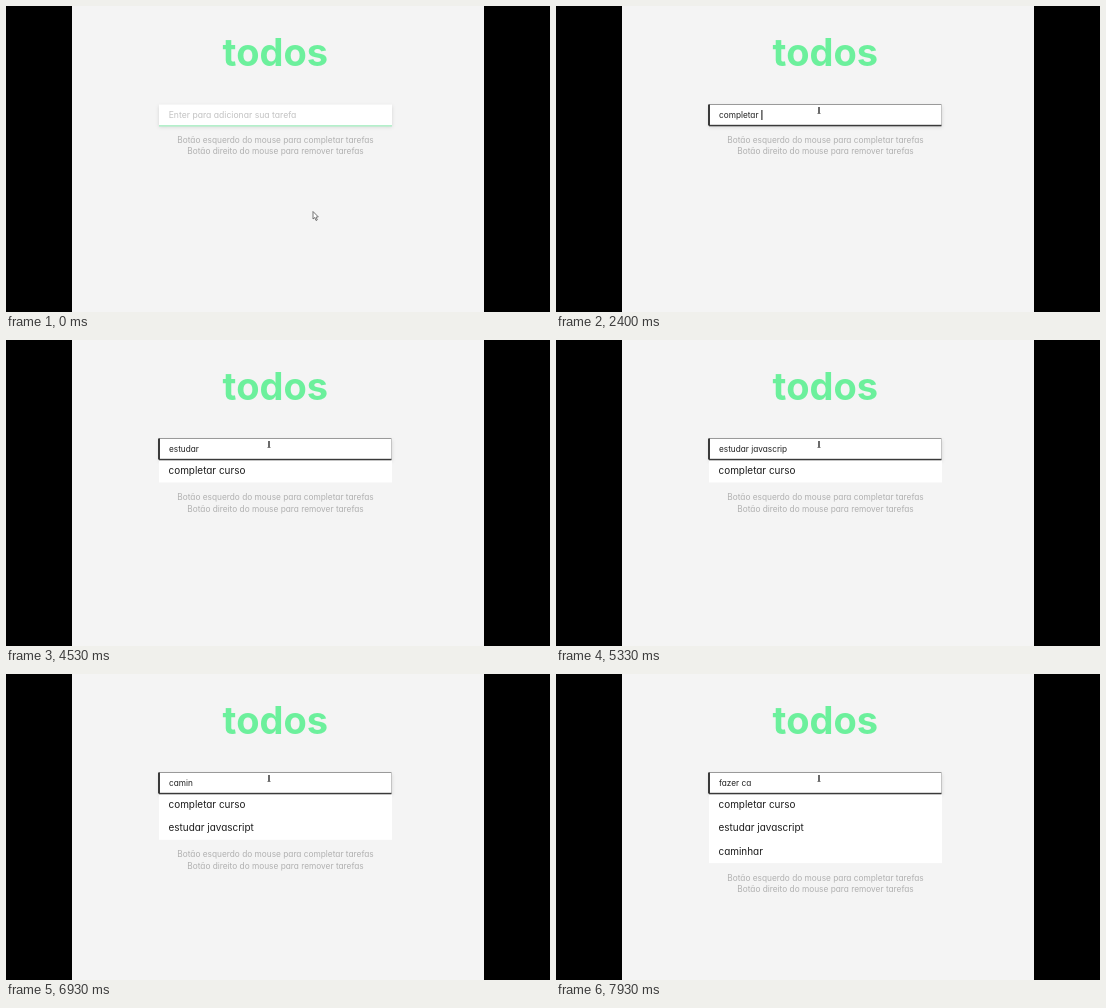
Recreate the animation shown at these times as an HTML page with a canvas. Size 544 px wide and 306 px high, loop 8000 ms.

```html
<!DOCTYPE html>
<html lang="pt">
<head>
<meta charset="utf-8">
<title>todos</title>
<style>
  html, body { margin: 0; width: 100%; height: 100%; overflow: hidden; background: #000; }
  canvas, svg { position: absolute; left: 0; top: 0; width: 544px; height: 306px; }
  svg { filter: blur(.35px); }
  text {
    font-family: Inter, "Open Sans", sans-serif;
    font-feature-settings: "cv11" 1;
    white-space: pre;
  }
  .title { font-size: 38px; font-weight: 700; fill: #6cf09c; text-anchor: middle; }
  .hint { font-size: 8.3px; fill: #b0b0b0; text-anchor: middle; }
  .ghost { font-size: 8.65px; fill: #c2c2c2; }
  .field { font-size: 8.25px; fill: #222; }
  .item { font-size: 9.95px; fill: #1c1c1c; }
</style>
</head>
<body>
<canvas id="stage" width="544" height="306"></canvas>
<svg id="words" viewBox="0 0 544 306"></svg>
<script>
const LOOP = 8000, TICK = 1000 / 15, ROW = 23.3;
const BOX = { x: 153, y: 98.5, w: 233, h: 21 };

// Key strokes per tick: "<" erases, "\n" adds the task
const KEYS = [
  [28, 'c|o|m|p|l|e|t|a|r |c|u|rs|o'], [44, '\n'],
  [52, 'e|s|t|d||<|<|<'], [63, 's|t|u|d|a|r| |j|ava'], [76, 's|c|r|i|p|t'], [85, '\n'],
  [101, 'c|a|m|in|har'], [109, '\n'],
  [112, 'f|a|z|e|r| |c|a']
];

// Tick ranges with a visible caret
const CARET = [
  [7, 10], [13, 15], [18, 21], [23, 26], [35, 37], [40, 42], [44, 46], [49, 52],
  [60, 63], [71, 74], [85, 88], [90, 93], [96, 98], [105, 108], [109, 112]
];

const canvas = document.getElementById('stage');
const ctx = canvas.getContext('2d');
const svg = document.getElementById('words');

const ratio = window.devicePixelRatio || 1;
canvas.width = 544 * ratio;
canvas.height = 306 * ratio;
ctx.scale(ratio, ratio);

function label(kind, x, y, content = '') {
  const el = document.createElementNS('http://www.w3.org/2000/svg', 'text');
  el.setAttribute('class', kind);
  el.setAttribute('x', x);
  el.setAttribute('y', y);
  el.textContent = content;
  svg.appendChild(el);
  return el;
}

label('title', 269.3, 60.3, 'todos');
const ghost = label('ghost', 162.7, 111.6, 'Enter para adicionar sua tarefa');
const field = label('field', 163, 111.6);
const items = [0, 1, 2].map(i => label('item', 162.5, 133.9 + i * ROW));
const hints = [
  label('hint', 269.5, 0, 'Botão esquerdo do mouse para completar tarefas'),
  label('hint', 269.5, 0, 'Botão direito do mouse para remover tarefas')
];

function stateAt(tick) {
  const tasks = [];
  let value = '';
  for (const [start, keys] of KEYS) {
    keys.split('|').forEach((key, i) => {
      if (start + i > tick) return;
      if (key === '\n') {
        tasks.push(value);
        value = '';
      } else if (key === '<') value = value.slice(0, -1);
      else value += key;
    });
  }
  return { tasks, value };
}

function rect(color, x, y, w, h) {
  ctx.fillStyle = color;
  ctx.fillRect(x, y, w, h);
}

function drawBox(focused, count) {
  ctx.save();
  ctx.shadowColor = 'rgba(0,0,0,.13)';
  ctx.shadowBlur = 4 * ratio;
  ctx.shadowOffsetY = ratio;
  rect('#fff', BOX.x, BOX.y, BOX.w, BOX.h);
  ctx.restore();
  if (count) rect('#fff', BOX.x, 119.5, BOX.w, count * ROW - 0.3);
  if (focused) {
    rect('#9a9a9a', 153, 98, 232.5, 1);
    rect('#c4c4c4', 385, 98.5, 1, 21);
    rect('#3a3a3a', 152, 98.5, 2, 21);
    rect('#3a3a3a', 153, 118.8, 232.5, 1.5);
  } else {
    rect('#b4f0cb', BOX.x, 119, BOX.w, 1.6);
  }
}

function drawArrow(x, y) {
  ctx.beginPath();
  [[0, 0], [0, 7.5], [1.8, 6], [3, 9], [4.3, 8.4], [3.1, 5.6], [5.3, 5.4]]
    .forEach(([dx, dy]) => ctx.lineTo(x + dx, y + dy));
  ctx.closePath();
  ctx.fillStyle = '#fff';
  ctx.strokeStyle = '#666';
  ctx.lineWidth = 0.9;
  ctx.fill();
  ctx.stroke();
}

function drawBeam(x, y) {
  rect('#2c2c2c', x - 0.7, y, 1.4, 7);
  rect('#777', x - 1.5, y + 6, 3, 1);
}

function drawPointer(tick) {
  const p = Math.min(1, Math.max(0, (tick - 4) / 3));
  const e = p * p * (3 - 2 * p);
  const x = 307 + (263 - 307) * e;
  const y = 205.5 + (101 - 205.5) * e;
  if (y < 119) drawBeam(x, y + (tick < 16 ? 1.5 : 0));
  else drawArrow(x, y);
}

function render(time) {
  const tick = Math.floor((time % LOOP + 4) / TICK) % 120;
  const { tasks, value } = stateAt(tick);

  field.textContent = value;
  ghost.setAttribute('visibility', value ? 'hidden' : 'visible');
  items.forEach((el, i) => { el.textContent = tasks[i] || ''; });
  hints.forEach((el, i) => el.setAttribute('y', 136.7 + i * 11.7 + tasks.length * ROW));

  rect('#000', 0, 0, 544, 306);
  rect('#f4f4f4', 66, 0, 412, 306);
  drawBox(tick >= 7, tasks.length);
  if (CARET.some(([on, off]) => tick >= on && tick < off)) {
    const w = value ? field.getComputedTextLength() + 0.5 : -0.3;
    rect('#222', 163 + w, 104, 1.1, 10);
  }
  drawPointer(tick);
}

const begin = performance.now();
function loop() {
  render(performance.now() - begin);
  requestAnimationFrame(loop);
}
loop();
</script>
</body>
</html>
```
